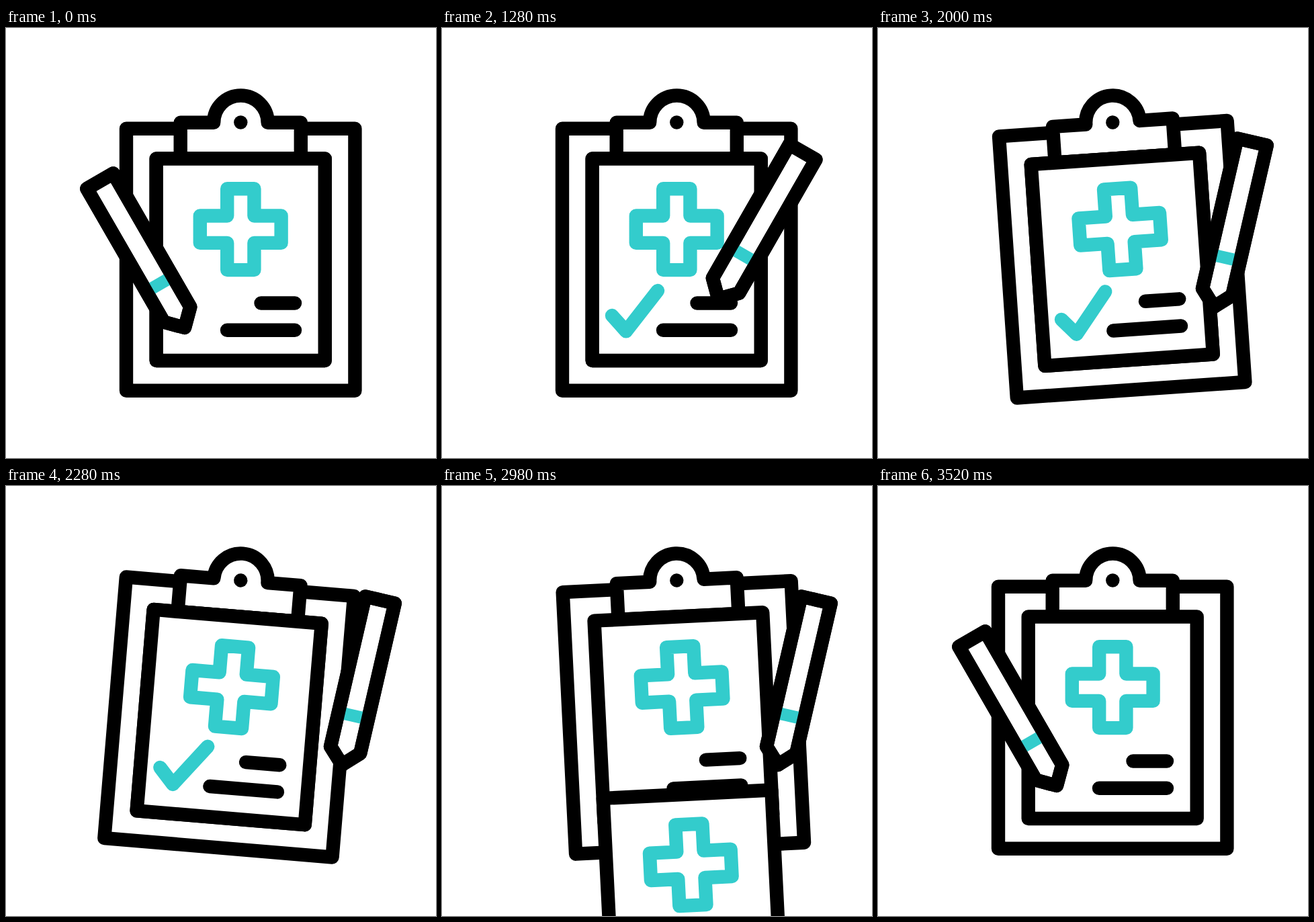
These frames come from a looping animation (640x640 px, 3.6 s). An HTML page:

```html
<!DOCTYPE html>
<html lang="en">
<head>
<meta charset="utf-8">
<title>Clipboard</title>
<style>
  html, body { margin: 0; width: 100%; height: 100%; overflow: hidden; background: #fff; }
  svg { display: block; width: 100%; height: 100%; }
  svg * { stroke-width: 20.4; stroke-linecap: round; stroke-linejoin: round; }
  .ink { stroke: #000; fill: #fff; }
  .teal { stroke: #3cc; fill: none; }
</style>
</head>
<body>
<svg viewBox="0 0 640 640">
  <defs>
    <g id="page">
      <rect class="ink" x="223.7" y="194.5" width="251" height="300.5"/>
      <path class="teal" d="M329.2 239.3h40.2v40.2h40.2v40.4h-40.2v40.2h-40.2v-40.2h-40.4v-40.4h40.4z"/>
      <path class="ink" d="M379.5 409.5H430M329 449.8H430"/>
    </g>
  </defs>
  <g id="board">
    <rect class="ink" x="179" y="149.7" width="340.4" height="390"/>
    <path class="ink" d="M259.7 194.5V140.7H309.2A40.2 40.2 0 0 1 389.6 140.7H438.8V194.5z"/>
    <circle cx="349.3" cy="140.5" r="10.2"/>
    <use href="#page"/>
    <g id="sheet">
      <use href="#page"/>
      <path id="check" class="teal"/>
    </g>
  </g>
  <g id="pen">
    <path class="ink" d="M-22.7 -252H22.7V-22.7L0 0L-22.7 -22.7z"/>
    <path d="M-14 -75H14" stroke="#3cc" style="stroke-width:18.5;stroke-linecap:butt"/>
    <path class="ink" style="fill:none" d="M-22.7 -252H22.7V-22.7L0 0L-22.7 -22.7z"/>
  </g>
</svg>
<script>
const LOOP = 3600;
const board = document.getElementById('board');
const sheet = document.getElementById('sheet');
const check = document.getElementById('check');
const pen = document.getElementById('pen');

// Pen poses: tip x, tip y, angle
const REST = [266, 446, -30];
const START = [253, 428, 47];
const CORNER = [274, 451.3, 47];
const END = [321, 391, 47];
const ASIDE = [500, 415, 13];

const dist = (a, b) => Math.hypot(b[0] - a[0], b[1] - a[1]);
const mix = (a, b, k) => a.map((v, i) => v + (b[i] - v) * k);
const ease = (t, from, to) => {
  const u = Math.min(1, Math.max(0, (t - from) / (to - from)));
  return (1 - Math.cos(Math.PI * u)) / 2;
};

const down = dist(START, CORNER);
const up = dist(CORNER, END);

function checkPoint(k) {
  const d = k * (down + up);
  return d < down ? mix(START, CORNER, d / down) : mix(CORNER, END, (d - down) / up);
}

function penPose(t) {
  if (t < 400) return mix(REST, START, ease(t, 0, 400));
  if (t < 1080) return checkPoint(ease(t, 400, 1080));
  if (t < 3200) return mix(END, ASIDE, ease(t, 1080, 1480));
  return mix(ASIDE, REST, ease(t, 3200, 3520));
}

function swing(t) {
  const first = 1803, half = 251, last = first + 6 * half;
  if (t < first) return 5 * ease(t, 1530, first);
  if (t < last) return 5 * Math.cos(Math.PI * (t - first) / half);
  return 5 * (1 - ease(t, last, 3520));
}

function drawCheck(k) {
  const tip = checkPoint(k);
  const points = k * (down + up) > down ? [START, CORNER, tip] : [START, tip];
  check.setAttribute('d', 'M' + points.map(p => p[0] + ' ' + p[1]).join('L'));
  check.style.display = k > 0 ? '' : 'none';
}

function render() {
  const t = performance.now() % LOOP;
  const [x, y, angle] = penPose(t);
  pen.setAttribute('transform', `translate(${x} ${y}) rotate(${angle})`);
  board.setAttribute('transform', `rotate(${swing(t)} 349.3 140.5)`);
  sheet.setAttribute('transform', `translate(0 ${526 * ease(t, 2720, 3240)})`);
  sheet.style.display = t < 3240 ? '' : 'none';
  drawCheck(ease(t, 400, 1080));
  requestAnimationFrame(render);
}
render();
</script>
</body>
</html>
```
